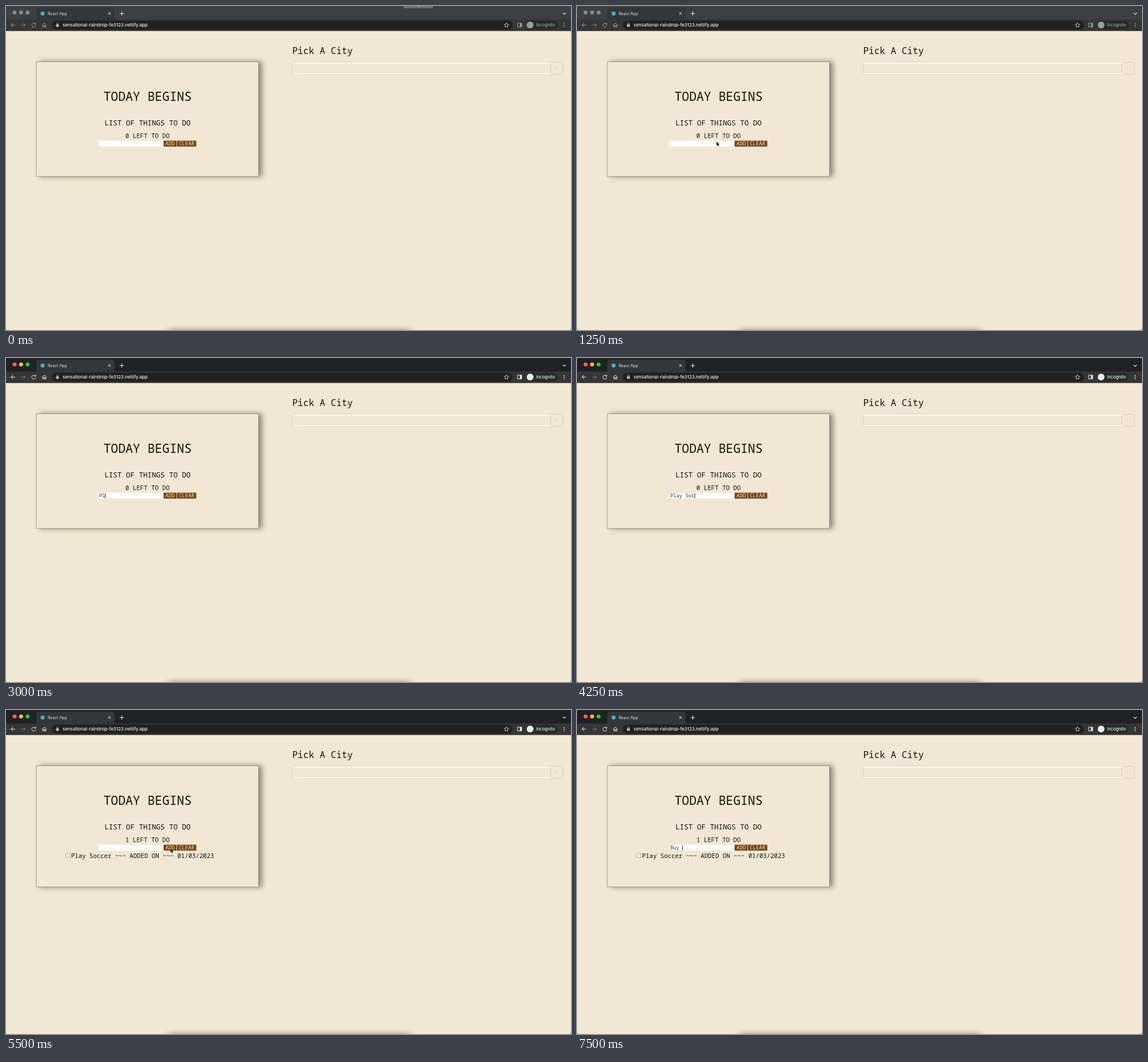
An HTML page that plays this animation: 988 by 567 pixels, repeating every 8000 ms.

```html
<!DOCTYPE html>
<html lang="en">
<head>
<meta charset="utf-8">
<title>To-do list</title>
<style>
  html, body { margin: 0; height: 100%; overflow: hidden; background: #f2e7d3; }
  svg { display: block; width: 988px; height: 567px; --strip: #3c4043; --icon: #9a9da1; --dim: #85888c; }
  svg.active { --strip: #202124; --icon: #e8eaed; --dim: #7c7e81; }
  .line { fill: none; stroke: var(--icon); stroke-width: 1; }
  .fill { fill: var(--icon); }
  .ui { font-family: Inter, Roboto, sans-serif; }
  .mono { font-family: "Noto Sans Mono", "DejaVu Sans Mono", monospace; font-weight: 300; fill: #111; white-space: pre; }
  .mid { text-anchor: middle; }
  .light { fill: #f5dcaa; font-size: 9.1px; }
  #card { filter: drop-shadow(6px 0 5px rgba(0, 0, 0, .42)); }
  #dock { filter: drop-shadow(0 0 6px rgba(0, 0, 0, .6)); }
</style>
</head>
<body>
<svg id="stage" viewBox="0 0 988 567">
  <rect width="988" height="567" fill="#f2e7d3"/>

  <!-- browser chrome -->
  <rect width="988" height="25" fill="var(--strip)"/>
  <rect y="23.5" width="988" height="20" fill="#35363a"/>
  <path d="M49 24q4 0 4-4V8q0-5 5-5H185q5 0 5 5v12q0 4 4 4z" fill="#35363a"/>
  <path d="M0 43.5H988" stroke="#4b4b4c" stroke-width=".8"/>
  <g id="lights">
    <circle cx="15" cy="11.3" r="3.5"/><circle cx="26.4" cy="11.3" r="3.5"/><circle cx="37.8" cy="11.3" r="3.5"/>
  </g>
  <g id="notch">
    <path d="M695 0h52v1.500q0 2.500-3 2.500H698q-3 0-3-2.500z" fill="#6a6c6e"/>
    <path d="M721 0l1.500 1.500L724 0" fill="none" stroke="#ddd" stroke-width=".8"/>
  </g>
  <circle cx="64" cy="13.200" r="3.600" fill="#4fa5bb"/>
  <text class="ui" x="73" y="15.700" font-size="6.900" fill="#dfe1e5">React App</text>
  <path d="M178.700 10.900l4.600 4.600m0-4.600l-4.600 4.600M202.500 9.500v7.400M198.800 13.200h7.400" fill="none" stroke="#e8eaed"/>
  <path d="M973.500 12l2.700 2.600 2.700-2.600" fill="none" stroke="#e8eaed" stroke-width="1.100"/>
  <rect x="80" y="25.500" width="806" height="15.800" rx="7.900" fill="#202124"/>
  <path class="line" d="M16 33.300H8.700M12.200 29.800L8.700 33.300l3.500 3.500"/>
  <path class="line" d="M26.500 33.300h7.300M30.300 29.800l3.500 3.500-3.500 3.500" style="stroke:var(--dim)"/>
  <path class="line" d="M51.300 31.200A3.500 3.500 0 1 0 52.100 34.200M52.100 29.300v2.700h-2.700"/>
  <path class="line" d="M63.300 33.300L67 30l3.700 3.300M64.300 32.800v4h1.800v-2.600h1.800v2.600h1.800v-4"/>
  <rect x="87.400" y="32" width="5" height="4.500" rx=".6" fill="#b5b8bc"/>
  <path d="M88.500 32v-1a1.400 1.400 0 0 1 2.800 0v1" fill="none" stroke="#b5b8bc" stroke-width=".8"/>
  <text class="ui" x="99" y="36" font-size="7.850" font-weight="500" fill="#eceef0">sensational-raindrop-fe3123.netlify.app</text>
  <path d="M875.200 29.300l1.200 2.700 2.900.3-2.200 1.900.7 2.900-2.600-1.500-2.600 1.500.7-2.900-2.200-1.900 2.900-.3z" fill="none" stroke="#dfe1e5" stroke-width=".8"/>
  <rect class="line" x="894.700" y="30" width="7" height="6.600"/>
  <rect class="fill" x="898.700" y="30" width="3" height="6.600"/>
  <rect x="909" y="25.800" width="56" height="15" rx="7.500" fill="#28292c"/>
  <circle class="fill" cx="916.500" cy="33.300" r="6"/>
  <text class="ui fill" x="927" y="36" font-size="7.400" font-weight="500">Incognito</text>
  <g class="fill"><circle cx="976" cy="30.500" r=".9"/><circle cx="976" cy="33.300" r=".9"/><circle cx="976" cy="36.100" r=".9"/></g>

  <!-- city picker -->
  <text class="mono" x="500.500" y="84" font-size="16.050">Pick A City</text>
  <rect x="500.500" y="98.300" width="473.500" height="21.400" rx="2.500" fill="none" stroke="#ccc8c0" stroke-width=".8"/>
  <path d="M501 99.400H953M501 118.500H953" stroke="#fff" stroke-width="1.500"/>
  <path d="M952.700 102v14M960.500 107.800l2.700 2.600 2.700-2.600" fill="none" stroke="#cbc6bd" stroke-width=".9"/>

  <!-- to-do card -->
  <rect id="card" x="53" y="97.700" width="388.500" fill="#f2e7d3" stroke="#857e74" stroke-width=".7"/>
  <text class="mono mid" x="247.500" y="165.700" font-size="21.400">TODAY BEGINS</text>
  <text class="mono mid" x="247.500" y="209" font-size="12.550">LIST OF THINGS TO DO</text>
  <text class="mono mid" id="count" x="247.500" y="230.700" font-size="10.750"></text>
  <rect x="161.700" y="235.800" width="114" height="10.200" fill="#fff"/>
  <text class="mono" id="entry" x="162.900" y="244" font-size="8.900" style="fill:#333"></text>
  <rect id="caret" y="236.500" width=".9" height="9" fill="#111"/>
  <path d="M275.600 235.800h22.500v10.200h-22.500zM298.900 235.800h33.800v10.200h-33.800z" fill="#70431a"/>
  <text class="mono mid light" x="287" y="244.100">ADD</text>
  <text class="mono mid light" x="315.800" y="244.100">CLEAR</text>
  <g id="item">
    <rect x="104.700" y="251.300" width="6.800" height="6.800" rx="1" fill="#fff" stroke="#767676" stroke-width=".7"/>
    <text class="mono" x="113.700" y="258.500" font-size="10.700">Play Soccer ~~~ ADDED ON ~~~ 01/03/2023</text>
  </g>

  <rect id="dock" x="284" y="569" width="422" height="20"/>
  <path d="M0 564v3h3q-3 0-3-3M988 564v3h-3q3 0 3-3" fill="#555"/>
  <path id="pointer" d="M0 0V8.200L1.900 6.500 3.100 9.300 4.400 8.800 3.200 6H5.500Z" fill="#000" stroke="#fff" stroke-width=".35"/>
</svg>
<script>
  const LOOP = 8000, FOCUS = 1500, ADDED = 5500, CHAR = 5.34;
  const $ = id => document.getElementById(id);
  const show = (id, on) => $(id).style.display = on ? "" : "none";

  // [start time, value]; each value holds until the next entry
  const pointer = [[0, null], [750, [381.5, 123]], [1000, [269, 202.5]], [1250, [244, 236.800]],
    [1500, [244, 241]], [2750, null], [5000, [249.500, 265.500]], [5250, [281.800, 242.200]],
    [5500, [287.500, 241.800]], [5750, [243.800, 243.500]], [6000, [226.500, 244.500]], [6750, null]];
  const typed = [[0, ""], [2750, "P"], [3000, "Pl"], [3500, "Play"], [3750, "Play "], [4000, "Play S"],
    [4250, "Play Soc"], [4500, "Play Socc"], [4750, "Play Soccer"], [ADDED, ""],
    [6750, "B"], [7250, "Buy"], [7500, "Buy "]];
  const caret = [[0, false], [2000, true], [2500, false], [2750, true], [5250, false],
    [6000, true], [6500, false], [6750, true]];
  const at = (track, t) => track.filter(([start]) => start <= t).pop()[1];

  function draw(t) {
    const active = t >= FOCUS, added = t >= ADDED;
    $("stage").classList.toggle("active", active);
    ["#ff5f57", "#febc2e", "#28c840"].forEach((color, i) =>
      $("lights").children[i].style.fill = active ? color : "#86898c");
    show("notch", t < 250);

    $("card").setAttribute("height", added ? 212 : 200.500);
    $("count").textContent = `${+added} LEFT TO DO`;
    show("item", added);

    const text = at(typed, t);
    $("entry").textContent = text;
    $("caret").setAttribute("x", 162.800 + CHAR * text.length);
    show("caret", at(caret, t));

    const tip = at(pointer, t);
    show("pointer", tip);
    if (tip) $("pointer").setAttribute("transform", `translate(${tip})`);
  }

  function tick() {
    draw(performance.now() % LOOP);
    requestAnimationFrame(tick);
  }
  tick();
</script>
</body>
</html>
```
